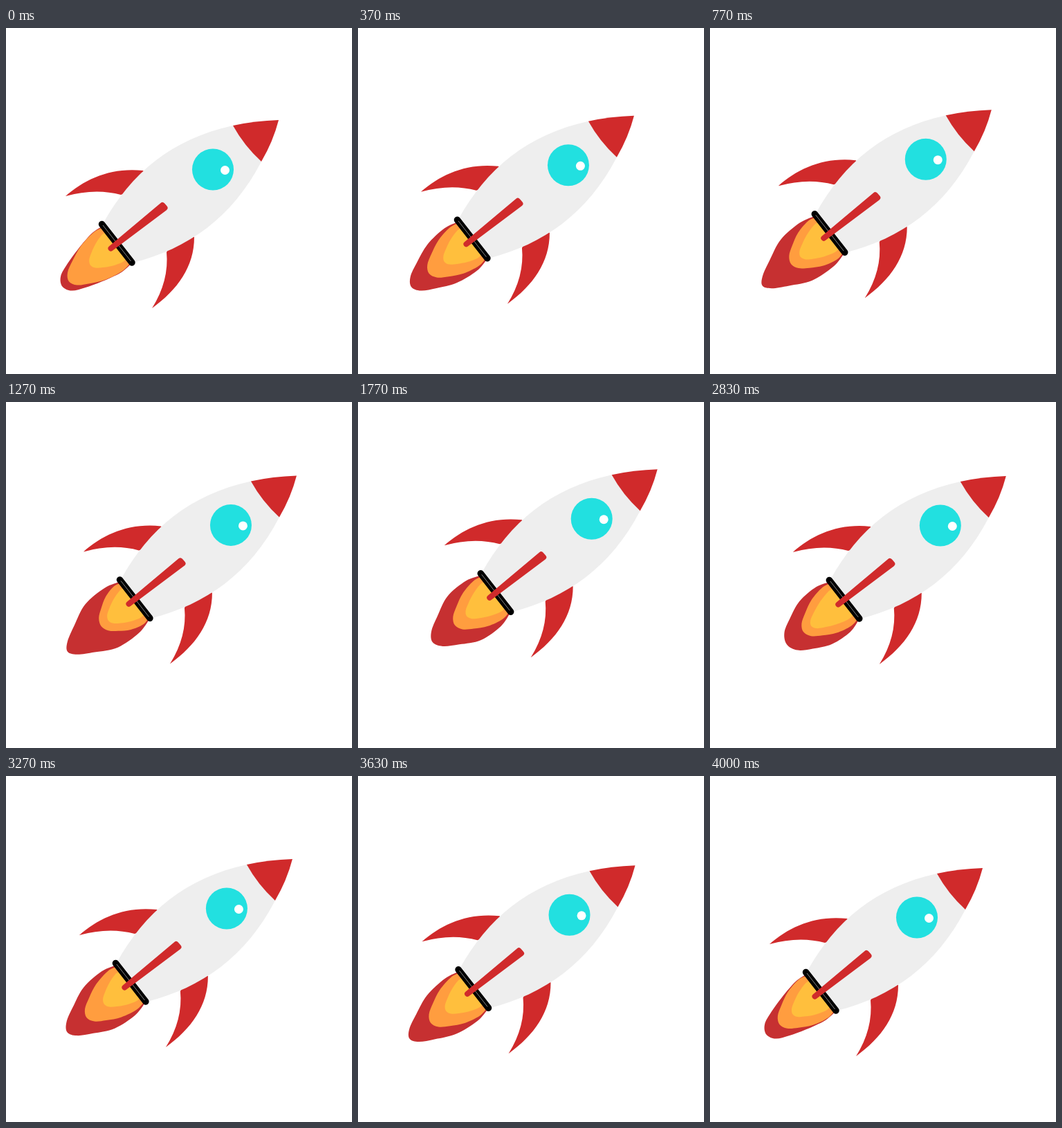
These frames come from a looping animation (500x500 px, 4.03 s). An HTML page:

```html
<!DOCTYPE html>
<html lang="en">
<head>
<meta charset="utf-8">
<title>Rocket</title>
<style>
  html, body { margin: 0; width: 100%; height: 100%; overflow: hidden; background: #fff; }
  svg { display: block; width: 100vw; height: 100vh; }
</style>
</head>
<body>
<svg viewBox="0 0 500 500">
  <g id="rocket">
    <g transform="translate(161 313) rotate(142.8)">
      <path id="outer" fill="#c63031"/>
      <path id="middle" fill="#ff9d3f"/>
      <path id="inner" fill="#ffbf3d"/>
    </g>
    <g fill="#d02a2b">
      <path d="M86 243C114 218 152 201 198 206L215 225 166 241Q129 231 86 243Z"/>
      <path d="M272 302C272 345 248 378 211 405Q236 365 232 324L245 300Z"/>
    </g>
    <path fill="#eee" d="M328 141C240 160 180 210 140 283L184 339C263 319 327 274 369 193L350 150Z"/>
    <path fill="#d02a2b" d="M328 141Q360 134 394 133Q386 164 369 193Q344 170 328 141Z"/>
    <circle cx="299" cy="204.5" r="30" fill="#22e0e0"/>
    <circle cx="316.5" cy="205.5" r="6.5" fill="#fff"/>
    <path d="M138.500 283.500L182 339" stroke="#000" stroke-width="9.500" stroke-linecap="round"/>
    <path d="M140 285L180.500 337" stroke="#aaa" stroke-width=".8"/>
    <path d="M151.500 318.500L226 256 229.500 260Z" fill="#d02a2b" stroke="#d02a2b" stroke-width="8" stroke-linejoin="round"/>
  </g>
</svg>
<script>
const LOOP = 4030;
const SECONDS = 4;
const TURN = 2.05;              // when the rocket starts back
const REACH = { x: 44, y: -39 };

const mix = (a, b, u) => a + (b - a) * u;
const smooth = u => u * u * (3 - 2 * u);

// Lengths are [seconds, length] keys; base and belly are half widths, tip a share of the belly
const flames = [
  {
    id: 'outer', base: 34,
    lengths: [[0, 100], [.75, 123], [1.25, 123], [2.25, 108], [2.6, 117], [2.83, 105], [3.25, 116], [3.8, 117], [4, 100]],
    belly: t => 29 + 11 * Math.sqrt(Math.sin(Math.PI * t / SECONDS)),
    tip: length => 5600 / length ** 2
  },
  {
    id: 'middle', base: 32,
    lengths: [[0, 88], [.75, 71], [1.25, 62], [2.25, 88], [2.83, 75], [3.25, 81], [4, 76]],
    belly: () => 30,
    tip: () => .47
  },
  {
    id: 'inner', base: 24,
    lengths: [[0, 49], [.75, 54], [1.25, 49], [2.25, 58], [2.83, 61], [3.25, 49], [4, 52]],
    belly: () => 20,
    tip: () => .46
  }
];

const rocket = document.getElementById('rocket');
for (const flame of flames) flame.node = document.getElementById(flame.id);

function valueAt(keys, t) {
  const next = Math.max(1, keys.findIndex(([time]) => time >= t));
  const [t0, a] = keys[next - 1], [t1, b] = keys[next];
  return mix(a, b, (t - t0) / (t1 - t0));
}

// Out and back along two arcs that bow to opposite sides
function drift(t) {
  const out = t < TURN;
  const u = out ? t / TURN : ((t - TURN) / (SECONDS - TURN)) ** 1.15;
  const p = out ? mix(u, smooth(u), .5) : 1 - smooth(u);
  const bow = (out ? -.2 : .25) * p * (1 - p);
  return [REACH.x * (p + bow), REACH.y * (p - bow)];
}

function smoothPath(pts) {
  let d = 'M' + pts[0];
  for (let i = 0; i < pts.length - 1; i++) {
    const p = pts[i], q = pts[i + 1];
    const before = pts[i - 1] || p, after = pts[i + 2] || q;
    const c1 = p.map((v, k) => v + (q[k] - before[k]) / 6);
    const c2 = q.map((v, k) => v - (after[k] - p[k]) / 6);
    d += `C${c1} ${c2} ${q}`;
  }
  return d + 'Z';
}

// A teardrop along the x axis, mirrored about it
function flamePath(flame, t) {
  const length = valueAt(flame.lengths, t);
  const belly = flame.belly(t);
  const tip = belly * flame.tip(length);
  const side = [
    [0, flame.base],
    [.2 * length, (flame.base + belly) * .56],
    [.5 * length, belly],
    [.75 * length, mix(tip, belly, .4)],
    [.93 * length, tip * .8]
  ];
  const mirrored = side.map(([x, y]) => [x, -y]).reverse();
  return smoothPath([...side, [length, 0], ...mirrored]);
}

// 24 drawings per second, shown on a 30 per second clock
function stepTime(ms) {
  const tick = Math.floor((ms + 3.4) * .03);
  return Math.min(SECONDS, Math.floor(tick * .8 + .25) / 24);
}

function render(ms) {
  const t = stepTime(ms % LOOP);
  rocket.setAttribute('transform', `translate(${drift(t)})`);
  for (const flame of flames) flame.node.setAttribute('d', flamePath(flame, t));
}

const begin = performance.now();
function loop() {
  render(performance.now() - begin);
  requestAnimationFrame(loop);
}
loop();
</script>
</body>
</html>
```
